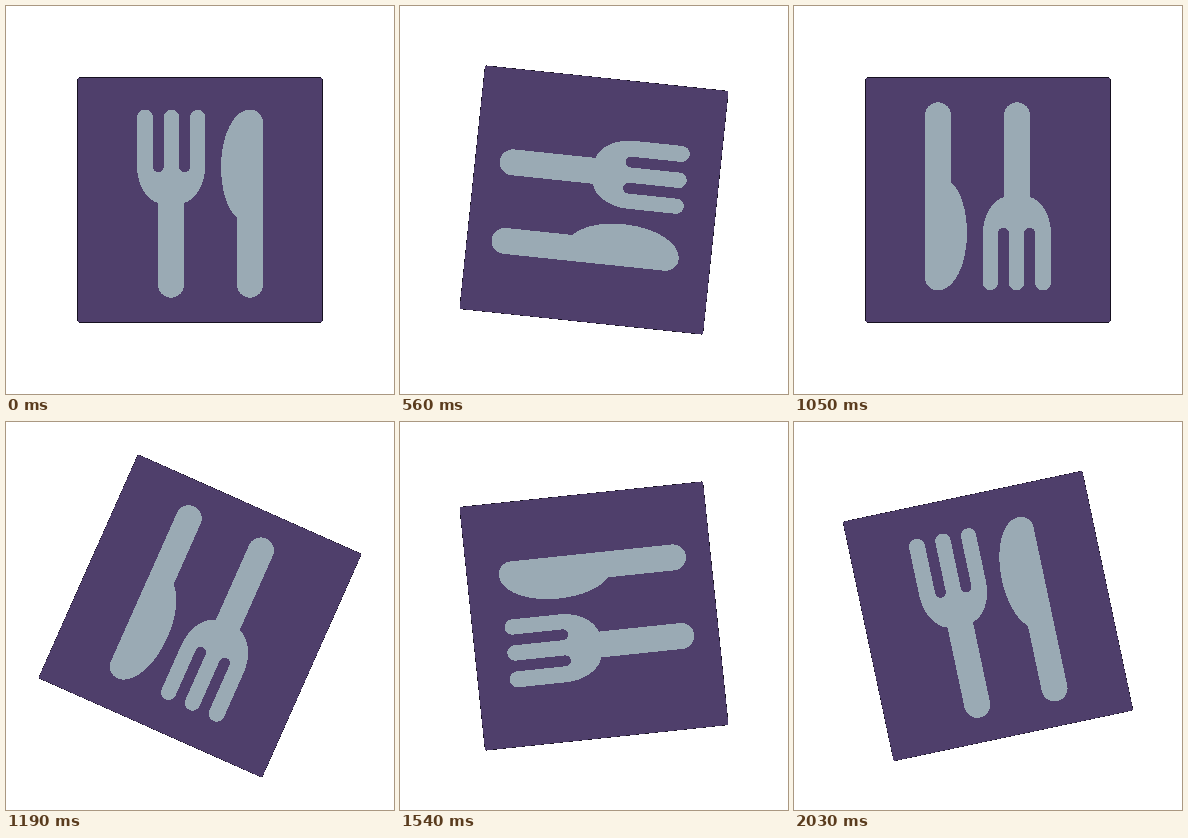
These frames come from a looping animation (388 px wide and 388 px high, 2100 ms). An HTML page:

```html
<!DOCTYPE html>
<html lang="en">
<head>
<meta charset="utf-8">
<title>Spinning cutlery sign</title>
<style>
  html, body { margin: 0; width: 100%; height: 100%; overflow: hidden; background: #fff; }
  svg { display: block; width: 100vw; height: 100vh; }
</style>
</head>
<body>
<svg viewBox="0 0 388 388" shape-rendering="crispEdges">
  <g id="sign">
    <rect x="71.4" y="71.4" width="245.2" height="245.2" rx="2" fill="#161120"/>
    <rect x="71.750" y="71.750" width="244.500" height="244.500" rx="1.5" fill="#4f3f6b"/>
    <g fill="#9aaab4">
      <!-- fork: three prongs, bowl, handle -->
      <path d="M131 160V111.500a8 8 0 0 1 16 0V161a5.400 5.400 0 0 0 10.800 0V111.500a7.700 7.700 0 0 1 15.400 0V161a5.400 5.400 0 0 0 10.800 0V111.500a7.600 7.600 0 0 1 15.200 0V160C199.200 178 190 193.500 178 197V278.700a13 13 0 0 1-26 0V197C140 193.500 131 178 131 160Z"/>
      <!-- knife: blade and handle -->
      <path d="M244 103.500a13 13 0 0 1 13 13V278.700a13 13 0 0 1-26 0V212C221 203 215 183 215 161C215 129 228 103.500 244 103.500Z"/>
    </g>
  </g>
</svg>
<script>
  const STEP_MS = 70, STEPS = 30;
  const sign = document.getElementById('sign');

  function draw(time) {
    const step = Math.floor(time / STEP_MS) % STEPS;
    sign.setAttribute('transform', `rotate(${step * 360 / STEPS} 194 194)`);
  }

  function tick() {
    draw(performance.now());
    requestAnimationFrame(tick);
  }
  tick();
</script>
</body>
</html>
```
